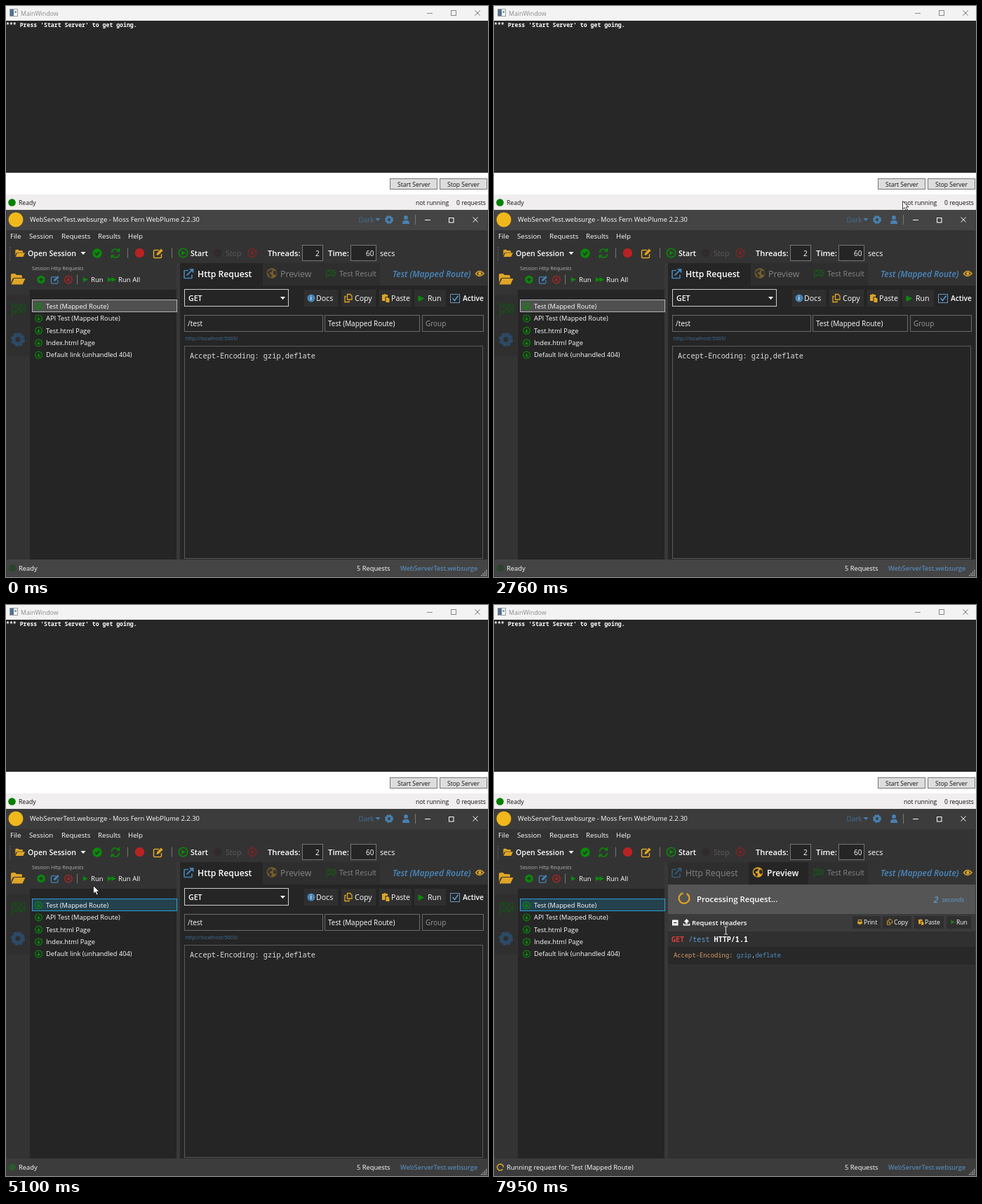
Animation of 687x815 px, one loop 8 s. Source, as an HTML page:

```html
<!DOCTYPE html>
<html lang="en">
<head>
<meta charset="utf-8">
<title>Request runner</title>
<style>
html, body { margin: 0; width: 100%; height: 100%; overflow: hidden; background: #333; }
svg { display: block; width: 687px; height: 815px; font-family: "Open Sans", "Noto Sans", sans-serif; }
.mono { font-family: "Noto Sans Mono", "DejaVu Sans Mono", monospace; }
.bar { fill: #444; }
.focused .bar { fill: #3c3c3c; }
</style>
</head>
<body>
<svg id="stage" viewBox="0 0 687 815"></svg>
<script>
const LOOP = 8000;
const GREEN = '#0a8a0a', GOLD = '#e0a526', BLUE = '#4682b4', WHITE = '#fff';

// Drawing helpers: each returns SVG markup.
const rect = (x, y, w, h, fill, stroke) =>
  `<rect x="${x}" y="${y}" width="${w}" height="${h}" fill="${fill}"${stroke ? ` stroke="${stroke}"` : ''}/>`;
const bar = (y, h) => `<rect class="bar" y="${y}" width="687" height="${h}"/>`;
const disc = (x, y, r, fill) => `<circle cx="${x}" cy="${y}" r="${r}" fill="${fill}"/>`;
const ring = (x, y, r, c, w = 1.3) =>
  `<circle cx="${x}" cy="${y}" r="${r}" fill="none" stroke="${c}" stroke-width="${w}"/>`;
const fill = (d, c) => `<path d="${d}" fill="${c}"/>`;
const line = (d, c, w = 1) => `<path d="${d}" fill="none" stroke="${c}" stroke-width="${w}"/>`;
const at = (x, y, body, k = 1) => `<g transform="translate(${x} ${y}) scale(${k})">${body}</g>`;
const group = (id, body = '') => `<g id="${id}">${body}</g>`;

// Text is placed by its left edge and the middle of its capitals.
const text = (x, y, s, size, c = WHITE, more = '') =>
  `<text x="${x}" y="${y + size * 0.36}" font-size="${size}" fill="${c}" ${more}>${s}</text>`;
const bold = (x, y, s, size, c = WHITE) => text(x, y, s, size, c, 'font-weight="600"');
const mono = (x, y, s, size, c = WHITE, more = '') => text(x, y, s, size, c, `class="mono" ${more}`);
const span = (s, c, more = '') => `<tspan fill="${c}" ${more}>${s}</tspan>`;

// Icons, centred on x, y.
const play = (x, y, c, k = 1) => at(x, y, fill('M-3.5-4 4 0-3.5 4z', c), k);
const caret = (x, y, c) => fill(`M${x - 3.5} ${y - 2}h7l-3.5 4z`, c);
const cross = (x, y, r, c, w) =>
  line(`M${x - r} ${y - r}l${2 * r} ${2 * r}m0 ${-2 * r}l${-2 * r} ${2 * r}`, c, w);
const crossRing = (x, y, r, c) => ring(x, y, r, c) + cross(x, y, r * 0.38, c, 1.3);
const folder = (x, y, k) => at(x, y,
  fill('M-10 5v-11q0-2 2-2h4l2 2h6q2 0 2 2v2h-11q-2 0-3 2z', GOLD) + fill('M-5.5-1h16l-4 8.5h-16z', GOLD), k);
const edit = (x, y, c, k = 1) => at(x, y,
  line('M1-4.500h-6q-1.500 0-1.500 1.500v8q0 1.500 1.500 1.500h8q1.500 0 1.500-1.500v-4', c, 1.5) +
  fill('M-2.500 3l.5-3 6-6.500 2.700 2.700-6.200 6z', c), k);
const gear = (x, y, c, hole, k = 1) => at(x, y,
  ring(0, 0, 4, c, 3.2) +
  '<circle r="5.7" fill="none" stroke="' + c + '" stroke-width="2" stroke-dasharray="2.9 1.577"/>' +
  disc(0, 0, 2, hole), k);
const flag = (x, y, c, k = 1) => {
  let squares = '';
  for (let i = 0; i < 12; i++) {
    const col = i % 4, row = i >> 2;
    if ((col + row) % 2 === 0) squares += rect(-4 + col * 2.7, -4.5 + row * 2.7, 2.7, 2.7, c);
  }
  return at(x, y, line('M-6-6v13', c, 1.4) + line('M-5-5q3-1 6 0t6 0v8q-3 1-6 0t-6 0', c) + squares, k);
};
const link = (x, y, c) => at(x, y,
  line('M0-4.500h-5q-1 0-1 1v9q0 1 1 1h9q1 0 1-1v-4', c, 1.7) +
  line('M-2.500 2.500 5-5', c, 2) + fill('M1-7h6.500v6.500z', c));
const globe = (x, y, c, land) => disc(x, y, 7.3, c) +
  at(x, y, fill('M-6-2l3-3 4 0-1 3-3 1 0 2 3 1-1 4-2 0-1-4-2-1zM3-4l3 1 1 3-2 3-3-2 0-3z', land));
const copy = (x, y, c, k = 1) => at(x, y,
  line('M-1.500-5.500h4l2.500 2.500v5h-6.500z', c, 1.3) + line('M-3-2.500h-2v8h6v-2', c, 1.3), k);
const paste = (x, y, c, k = 1) => at(x, y,
  fill('M-5-5h2.500q1.500-2 3 0h2.500v3h-3.500v6h-4.500z', c) + fill('M.5-1h3l2 2v5h-5z', c), k);
const printer = (x, y, c, k = 1) => at(x, y,
  line('M-2.500-.5v-3h5v3', c, 1.2) + rect(-4, -0.5, 8, 3, c) + rect(-2.5, 1.2, 5, 2.6, c), k);
const down = y => ring(46.5, y, 4.9, GREEN, 1.2) +
  line(`M46.5 ${y - 2.7}v4.7m-2.2-2 2.2 2.4 2.2-2.4`, GREEN, 1.3);
const divider = (x, y) => line(`M${x} ${y - 7}v14`, '#777');

function serverWindow() {
  return rect(0, 0, 687, 21, '#f3f3f3') + rect(0, 21, 687, 217, '#272727') +
    rect(0, 238, 687, 31, WHITE) + rect(0, 269, 687, 23, '#f0eeee') +
    rect(5.5, 4.5, 11, 10, WHITE, '#999') + rect(6, 5, 5, 9, '#51708a') + rect(12, 7, 3, 3, '#8ab') +
    text(21, 10.5, 'MainWindow', 8.8, '#8a8a8a') +
    line('M600 10.500h8', '#888') + rect(634.5, 6.5, 7, 7, 'none', '#888') + cross(672, 10, 3.7, '#777', 1) +
    mono(0, 27, "*** Press 'Start Server' to get going.", 8.2, WHITE, 'font-weight="600"') +
    rect(547.5, 246.5, 67, 15, '#ddd', '#777') + text(558, 254.5, 'Start Server', 8.55, '#111') +
    rect(618.5, 246.5, 67, 15, '#ddd', '#777') + text(629, 254.5, 'Stop Server', 8.55, '#111') +
    disc(8.5, 280.5, 5.3, '#008000') + text(18, 280.5, 'Ready', 8.6, '#111') +
    text(584, 280.5, 'not running', 8.6, '#111') + text(642, 280.5, '0 requests', 8.6, '#111');
}

function titleAndTools() {
  const menu = [[6, 'File'], [33, 'Session'], [79, 'Requests'], [131, 'Results'], [174, 'Help']];
  let grip = '';
  for (let y = 344; y < 363; y += 3) grip += rect(5, y, 1.3, 1.3, '#666');
  return rect(0, 291, 687, 524, '#333') + bar(291, 29) +
    disc(14, 305, 10.5, '#f0b81a') +
    text(34, 305, 'WebServerTest.websurge - Moss Fern WebPlume 2.2.30', 9.4) +
    text(502.5, 305, 'Dark', 9.9, '#416d95') + caret(530, 305, BLUE) +
    gear(546, 305, BLUE, '#444', 0.9) +
    disc(570, 302, 2.9, BLUE) + fill('M565 311q0-5 3-5h4q3 0 3 5z', BLUE) + divider(583.5, 305) +
    line('M597 305.500h8', WHITE) + rect(631.5, 302.5, 6.5, 6.5, 'none', WHITE) + cross(669, 305, 3.5, WHITE, 1) +
    menu.map(([x, s]) => text(x, 328.5, s, 9.7)).join('') +
    grip + folder(20, 353, 0.67) + bold(31, 353, 'Open Session', 10.6) + caret(110, 353, WHITE) +
    disc(130, 353, 6.7, GREEN) + line('M127 353l2.200 2.200 4-4.200', '#2b2b2b', 1.7) +
    line('M150.500 352q1-5 5.500-5 3 0 5 2.500m.5-3.500v4h-4M161.500 354q-1 5-5.500 5-3 0-5-2.500m-.5 3.500v-4h4', GREEN, 1.7) +
    divider(173.5, 352.5) + disc(190.5, 352.5, 6.7, '#b92222') + edit(217, 353, GOLD) + divider(236.5, 352.5) +
    ring(252.5, 352.5, 6.2, GREEN, 1.6) + play(253, 352.5, GREEN, 0.8) + bold(263, 353, 'Start', 10.6) +
    disc(302, 352.5, 5.5, '#302a2a') + text(313, 353, 'Stop', 10.6, '#5a5a5a') + crossRing(351, 352.5, 5.8, '#8d2020') +
    bold(373, 353, 'Threads:', 11.2) + rect(422.5, 341.5, 29, 22, '#252525', '#777') + text(441, 353, '2', 10) +
    bold(459, 353, 'Time:', 11.3) + rect(491.5, 341.5, 36, 22, '#252525', '#777') + text(513, 353, '60', 10) +
    text(533, 353, 'secs', 10.7);
}

function sessionList() {
  const rows = ['Test (Mapped Route)', 'API Test (Mapped Route)', 'Test.html Page', 'Index.html Page',
    'Default link (unhandled 404)'];
  return rect(0, 413, 33, 86, '#2f2f2f') + rect(34, 405, 209, 385, '#252525') +
    rect(243, 367, 5, 423, '#383838') +
    folder(17, 390, 1) + flag(17.5, 433, '#1d4a1d', 1.45) + gear(17, 476, '#2c4a66', '#2f2f2f', 1.5) +
    text(37, 374.5, 'Session Http Requests', 7.1, '#b0b0b0') +
    disc(50, 390.5, 5.7, GREEN) + line('M47 390.500h6m-3-3v6', '#2b2b2b', 1.5) +
    edit(70, 390.5, BLUE, 0.86) + crossRing(89, 390.5, 5.2, '#b02525') + divider(101.5, 390.5) +
    group('hover', rect(107.5, 381.5, 32, 17, '#2f3d4d', '#56789b')) +
    play(113, 390.5, GREEN, 0.9) + text(121, 390.5, 'Run', 9.6) +
    play(148, 390.5, GREEN, 0.9) + play(153.5, 390.5, GREEN, 0.9) + text(160, 390.5, 'Run All', 9.65) +
    '<rect id="row" x="37.5" y="419.5" width="206" height="17"/>' +
    rows.map((s, i) => down(428.5 + i * 17.4) + text(57, 428.5 + i * 17.4, s, 9.3)).join('');
}

function tabs(preview) {
  const [x, w] = preview ? [363, 85] : [248, 118];
  const label = (on, ...a) => on ? bold(...a) : text(...a, '#858585');
  return rect(248, 367, 285, 32, '#2e2e2e') + rect(x, 367, w, 32, '#252525') +
    link(260, 382, preview ? '#365874' : BLUE) + label(!preview, 273, 382.5, 'Http Request', 12.2) +
    globe(preview ? 376 : 379, 381.5, preview ? GOLD : '#765d28', preview ? '#2b2b2b' : '#333') +
    label(preview, preview ? 389 : 391, 382.5, 'Preview', preview ? 12 : 12.3) +
    flag(preview ? 462 : 463, 382, '#1d521d') + text(475, 382, 'Test Result', 10.6, '#858585');
}

function requestPane() {
  const button = (x, w, icon, tx, s) => rect(x, 405, w, 24, '#2f2f2f') + icon + text(tx, 417.5, s, 10.6);
  const field = (x, w, s, c) => rect(x + 0.5, 441.5, w, 23, '#252525', '#6a6a6a') + text(x + 5, 453.5, s, 9.95, c);
  return tabs(false) + rect(248, 399, 439, 391, '#252525') +
    rect(254.5, 404.5, 148, 24, '#252525', '#ccc') + bold(260, 417, 'GET', 10.6) + caret(394.5, 417, WHITE) +
    button(425, 48, disc(435, 417, 5.6, BLUE) + bold(433.6, 417, 'i', 8.5), 442, 'Docs') +
    button(478, 49, copy(488, 417, GOLD), 497, 'Copy') +
    button(532, 46, paste(541, 417, GOLD), 549, 'Paste') +
    button(582, 45, play(591.5, 417.5, GREEN, 1.15), 601, 'Run') +
    rect(633.5, 411.5, 13, 12, '#252525', '#6b96ba') + line('M636.500 417l3 3.500 5-7', '#5b9bd5', 1.5) +
    bold(651, 417.5, 'Active', 10.2) +
    field(254, 197, '/test', WHITE) + field(454, 135, 'Test (Mapped Route)', WHITE) + field(593, 87, 'Group', '#9a9a9a') +
    text(255.5, 474.5, 'http://localhost:5003/', 7.5, '#41709c') +
    rect(254.5, 485.5, 425, 303, '#252525', '#5a5a5a') +
    mono(262, 499, 'Accept-Encoding: gzip,deflate', 10.29, '#ddd');
}

function previewPane() {
  const button = (x, w, icon, tx, s) => rect(x, 444, w, 18, '#2f2f2f') + icon + text(tx, 452.5, s, 8.6);
  const blue = '#5d9bd0', italic = 'font-style="italic"';
  const body = rect(248, 399, 439, 42, '#555') + group('bigSpin') + bold(289, 420, 'Processing Request...', 11.35) +
    group('timer', text(626.5, 420, span('', blue, 'id="secs"'), 12.5, blue, `font-weight="600" ${italic}`) +
      text(638.5, 421, 'seconds', 9, blue, italic)) +
    rect(248, 441, 439, 25, '#3b3b3b') +
    rect(254, 449.5, 8.5, 8, WHITE) + line('M256 453.500h4.500', '#333', 1.4) +
    fill('M274.500 448l4 4.300h-2.600v3h-2.800v-3h-2.600z', WHITE) + line('M270.500 454.500v2.300h8v-2.300', WHITE, 1.6) +
    bold(282, 453.5, 'Request Headers', 9.55) +
    button(511, 40, printer(521.5, 452.5, GOLD, 0.85), 527, 'Print') +
    button(554, 41, copy(564, 452.5, GOLD, 0.7), 570, 'Copy') +
    button(599, 42, paste(608.5, 452.5, GOLD, 0.7), 614, 'Paste') +
    button(645, 35, play(654, 452.5, '#237a23', 0.75), 659, 'Run') +
    mono(253, 477.5, span('GET', '#e03c3c', 'font-weight="700"') + span(' /test', '#5a9bd0') +
      span(' HTTP/1.1', WHITE, 'font-weight="700"'), 10.1) +
    rect(248, 488, 439, 25, '#282828') +
    mono(256, 500, span('Accept-Encoding', '#d99a68') + span(':', '#ddd') + span(' gzip', '#4f8fc6') +
      span(',', '#ddd') + span('deflate', '#4f8fc6'), 8.8);
  return tabs(true) + rect(248, 399, 439, 391, '#303030') + group('result', body);
}

function statusBar() {
  let grip = '';
  for (let r = 0; r < 4; r++)
    for (let c = 3 - r; c < 4; c++) grip += rect(677 + c * 2.4, 805 + r * 2.4, 1.3, 1.3, '#ccc');
  return bar(790, 25) +
    group('idle', '<circle id="dot" cx="9" cy="802.5" r="5"/>' + text(18, 802.5, 'Ready', 9.4)) +
    group('busy', group('smallSpin') + text(18, 802.5, 'Running request for: Test (Mapped Route)', 9.3)) +
    text(500, 802.5, '5 Requests', 9.3) + text(562, 802.5, 'WebServerTest.websurge', 9.4, '#5b9bd5') +
    grip + line('M.5 291v523.500h686v-523', '#3a3a3a');
}

const arrow = '<path d="M.5.500v11.500l2.700-2.400 2 4.300 2-.9-1.900-4.100h3.600z" fill="#fff" stroke="#111" stroke-width=".8"/>';
const beam = line('M-2.500-5.500h2l.5.5.5-.5h2M0-5v10M-2.500 5.500h2l.5-.5.5.5h2', '#ddd');

const stage = document.getElementById('stage');
stage.innerHTML = serverWindow() + titleAndTools() + sessionList() +
  text(551, 382.5, 'Test (Mapped Route)', 12, '#4a88c0', 'font-weight="600" font-style="italic"') +
  line('M669.500 382q5.500-7 11.500 0-6 7-11.500 0z', GOLD, 1.4) + disc(675.3, 382, 2.3, GOLD) +
  group('request', requestPane()) + group('preview', previewPane()) + statusBar() +
  group('arrow', arrow) + group('beam', beam);

const $ = id => document.getElementById(id);
const show = (id, on) => { $(id).style.display = on ? '' : 'none'; };
const move = (id, x, y, deg = 0) => $(id).setAttribute('transform', `translate(${x} ${y}) rotate(${deg})`);

// An open ring with its gap at the top.
const notch = (r, w) => line(`M${r * 0.34} ${-r * 0.94}A${r} ${r} 0 1 1 ${-r * 0.34} ${-r * 0.94}`, GOLD, w);
$('bigSpin').innerHTML = notch(7.4, 2.1);
$('smallSpin').innerHTML = notch(4.5, 1.5);

// Pointer tip: time, x, y.
const path = [
  [280, 671, 775], [620, 330, 390], [1020, 11, 32], [1090, 5, 24], [1160, 16, 29], [1230, 16, 29],
  [1500, 170, 85], [1890, 489, 222], [2320, 611, 281], [2470, 608, 281], [2690, 580, 279],
  [2760, 582, 278], [2840, 582, 278], [3130, 590, 279], [3500, 586, 280], [3880, 340, 352],
  [4300, 111, 430], [4450, 103, 431], [4670, 104, 430], [5100, 124, 400], [5170, 124, 400],
  [5460, 128, 397], [5900, 128, 399], [6270, 130, 399], [6420, 137, 402], [6720, 204, 430],
  [7220, 322, 462], [7500, 330, 464]
];
function pointer(t) {
  const i = path.findIndex(p => p[0] > t);
  if (i < 0) return path[path.length - 1].slice(1);
  const [t0, x0, y0] = path[i - 1], [t1, x1, y1] = path[i], k = (t - t0) / (t1 - t0);
  return [Math.round(x0 + (x1 - x0) * k), Math.round(y0 + (y1 - y0) * k)];
}

function draw(t) {
  const focused = t >= 4670, running = t >= 5460;
  stage.classList.toggle('focused', focused);
  $('row').setAttribute('fill', focused ? '#24414e' : '#505050');
  $('row').setAttribute('stroke', focused ? '#2a9fd6' : '#b5b5b5');
  $('dot').setAttribute('fill', focused ? '#2a5a2a' : '#2a462a');
  show('hover', t >= 5180 && t < 6320);
  show('request', !running);
  show('preview', running);
  show('result', t >= 5540);
  show('idle', !running);
  show('busy', running);

  const seconds = Math.floor((t - 5460) / 1000);
  show('timer', seconds >= 1);
  $('secs').textContent = Math.max(seconds, 1);
  const turn = (t - 5900) * 0.18;
  move('bigSpin', 271, 418.5, turn);
  move('smallSpin', 9, 802.5, turn + 100);

  const visible = t >= 280;
  const [x, y] = visible ? pointer(t) : [0, 0];
  const overText = running && x > 281 && y > 446;
  show('arrow', visible && !overText);
  show('beam', visible && overText);
  move('arrow', x, y);
  move('beam', x + 0.5, y + 0.5);
}

function tick() {
  draw(performance.now() % LOOP);
  requestAnimationFrame(tick);
}
tick();
</script>
</body>
</html>
```
